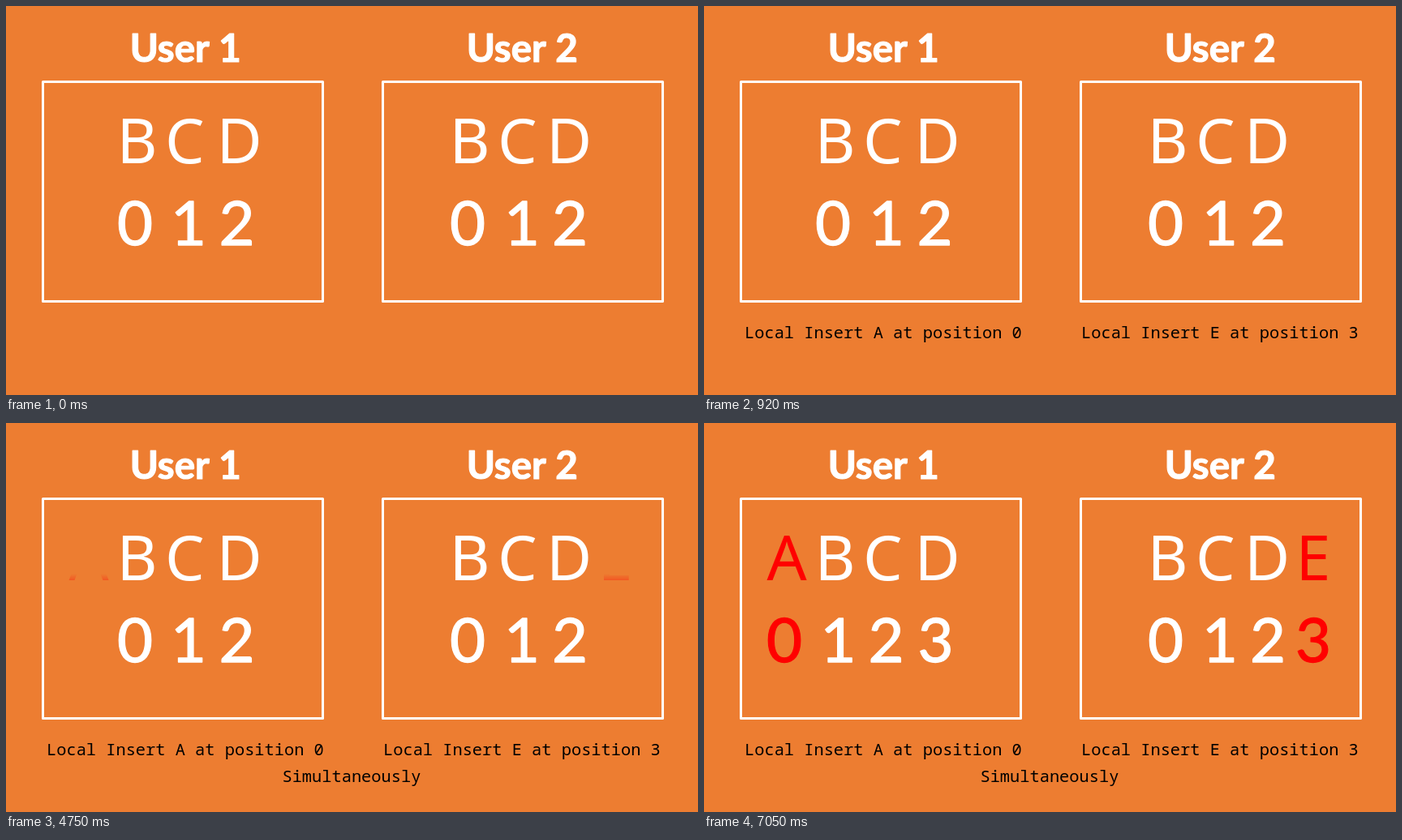
Animation, 853 px wide and 480 px high, one loop 8 s. Source, as an HTML page with a canvas:

```html
<!DOCTYPE html>
<html lang="en">
<head>
<meta charset="utf-8">
<title>Concurrent inserts</title>
<style>
html, body { margin: 0; width: 100%; height: 100%; overflow: hidden; background: #ed7d31; }
canvas { display: block; }
</style>
</head>
<body>
<canvas id="stage" width="853" height="480"></canvas>
<script>
const ctx = document.getElementById('stage').getContext('2d');
const LOOP = 8000, STEP = 60, SOFT = 26;
const WHITE = '255,255,255', RED = '255,0,0';

// weight: extra outline that thickens the strokes.
const LETTER = { font: '77px "Noto Sans", sans-serif', y: 194, weight: 0 };
const DIGIT = { font: '76px Lato, sans-serif', y: 295, weight: 1.3 };
const TITLE = { font: 'bold 47.5px Lato, sans-serif', y: 69, weight: 1.2 };
const MONO = '20.35px "Noto Sans Mono", monospace';

// Progress 0..1 in equal steps; the first step shows at once.
function stepped(t, start, count) {
  const n = Math.floor((t - start) / STEP) + 1;
  return Math.max(0, Math.min(count, n)) / count;
}

// Text whose ink is centred on x.
function inkText(text, x, y, weight = 0) {
  const m = ctx.measureText(text);
  const left = x - (m.actualBoundingBoxRight - m.actualBoundingBoxLeft) / 2;
  ctx.fillText(text, left, y);
  if (weight) {
    ctx.lineWidth = weight;
    ctx.strokeStyle = ctx.fillStyle;
    ctx.strokeText(text, left, y);
  }
}

// Soft-edged paint that travels upwards from below the baseline.
function wipe(rgb, base, p, leaving) {
  const edge = base + 18 - 4 * SOFT * p;
  const g = ctx.createLinearGradient(0, edge, 0, edge + SOFT);
  g.addColorStop(0, `rgba(${rgb},${leaving ? 1 : 0})`);
  g.addColorStop(1, `rgba(${rgb},${leaving ? 0 : 1})`);
  return g;
}

function row(text, centres, style, paint) {
  ctx.font = style.font;
  ctx.fillStyle = paint;
  centres.forEach((x, i) => inkText(text[i], x, style.y, style.weight));
}

function wipeRow(text, centres, style, rgb, p, leaving = false) {
  if (p === (leaving ? 1 : 0)) return;
  const solid = p === (leaving ? 0 : 1);
  row(text, centres, style, solid ? `rgb(${rgb})` : wipe(rgb, style.y, p, leaving));
}

function panel(x, title, titleX) {
  ctx.strokeStyle = '#fff';
  ctx.lineWidth = 3;
  ctx.lineJoin = 'round';
  ctx.strokeRect(x, 93.5, 345, 271);
  ctx.font = TITLE.font;
  ctx.fillStyle = '#fff';
  inkText(title, titleX, TITLE.y, TITLE.weight);
}

function caption(text, x, y, alpha) {
  if (!alpha) return;
  ctx.font = MONO;
  ctx.fillStyle = `rgba(0,0,0,${alpha})`;
  inkText(text, x, y);
}

function draw(t) {
  const note = stepped(t, 500, 8);
  const together = stepped(t, 2590, 8);
  const insert = stepped(t, 4750, 4);
  const renumber = stepped(t, 6870, 4);

  ctx.fillStyle = '#ed7d31';
  ctx.fillRect(0, 0, 853, 480);

  panel(45.5, 'User 1', 221.5);
  panel(464.5, 'User 2', 637);

  row('BCD', [163, 221.5, 289], LETTER, '#fff');
  row('BCD', [573, 631.5, 695.5], LETTER, '#fff');
  wipeRow('A', [102.5], LETTER, RED, insert);
  wipeRow('E', [752.5], LETTER, RED, insert);

  wipeRow('012', [159, 225.5, 284], DIGIT, WHITE, renumber, true);
  wipeRow('123', [166, 224, 285], DIGIT, WHITE, renumber);
  wipeRow('0', [99], DIGIT, RED, renumber);
  row('012', [569, 636.5, 694.5], DIGIT, '#fff');
  wipeRow('3', [750.5], DIGIT, RED, renumber);

  caption('Local Insert A at position 0', 221.3, 410, note);
  caption('Local Insert E at position 3', 636.3, 410, note);
  caption('Simultaneously', 426.3, 443, together);
}

const begin = performance.now();
function tick() {
  draw((performance.now() - begin) % LOOP);
  requestAnimationFrame(tick);
}
tick();
</script>
</body>
</html>
```
